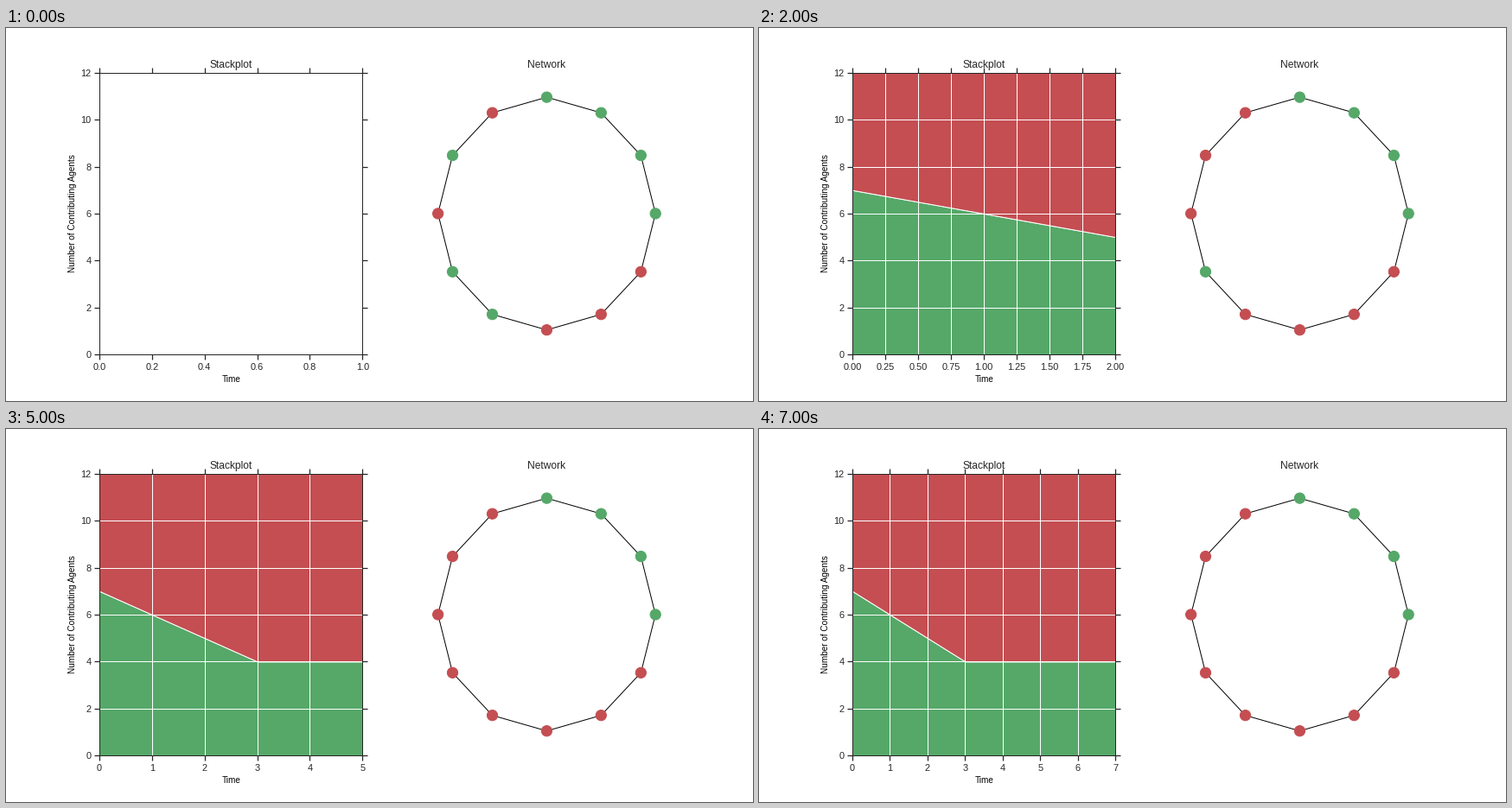
A matplotlib script for the animation above (8000 ms loop, 864 px wide and 432 px high).

```python
import matplotlib.pyplot as plt
import numpy as np
from matplotlib.animation import FuncAnimation

GREEN, RED, INK = "#55a868", "#c44e52", "0.15"
AGENTS, STEPS = 12, 8
START_GREEN = {0, 1, 2, 3, 5, 7, 8}
DEFECTS = [5, 8, 7]  # agents turning red, one per step

plt.rcParams.update({
    "font.family": "Liberation Sans",
    "text.color": INK,
    "axes.edgecolor": INK,
    "axes.linewidth": 1.0,
    "axes.axisbelow": "line",
})


def greens_at(step):
    return START_GREEN - set(DEFECTS[:step])


def add_title(ax, text):
    ax.set_title(text, fontsize=12, y=1.0, pad=6)


fig, (stack_ax, net_ax) = plt.subplots(1, 2, figsize=(12, 6), dpi=72)
fig.subplots_adjust(left=0.125, right=0.9, bottom=0.125, top=0.88, wspace=0.2)

add_title(stack_ax, "Stackplot")
stack_ax.set_xlabel("Time", fontsize=10, color="black")
stack_ax.set_ylabel("Number of Contributing Agents", fontsize=10, color="black")
stack_ax.set_ylim(0, AGENTS)
stack_ax.grid(True, color="white", linewidth=1)
stack_ax.tick_params(which="both", direction="out", top=True, right=True,
                     length=6, width=1.25, pad=3.5, labelsize=11,
                     color=INK, labelcolor=INK)

add_title(net_ax, "Network")
net_ax.set_axis_off()
net_ax.set_xlim(-1.21, 1.21)
net_ax.set_ylim(-1.21, 1.21)
angles = 2 * np.pi * np.arange(AGENTS + 1) / AGENTS
ring_x, ring_y = np.cos(angles), np.sin(angles)
net_ax.plot(ring_x, ring_y, color="black", linewidth=1, zorder=1)
nodes = net_ax.scatter(ring_x[:-1], ring_y[:-1], s=150, linewidths=1, zorder=2)


def draw(step):
    for area in list(stack_ax.collections):
        area.remove()
    if step:
        times = np.arange(step + 1)
        green = np.array([len(greens_at(t)) for t in times])
        stack_ax.stackplot(times, green, AGENTS - green, colors=[GREEN, RED],
                           edgecolor="white", linewidth=1)
    stack_ax.set_xlim(0, max(step, 1))
    stack_ax.set_ylim(0, AGENTS)

    active = greens_at(step)
    colors = [GREEN if i in active else RED for i in range(AGENTS)]
    nodes.set_facecolor(colors)
    nodes.set_edgecolor(colors)
    return []


anim = FuncAnimation(fig, draw, frames=STEPS, init_func=lambda: draw(0),
                     interval=1000, repeat=True, repeat_delay=0, blit=False)
plt.show()
```
